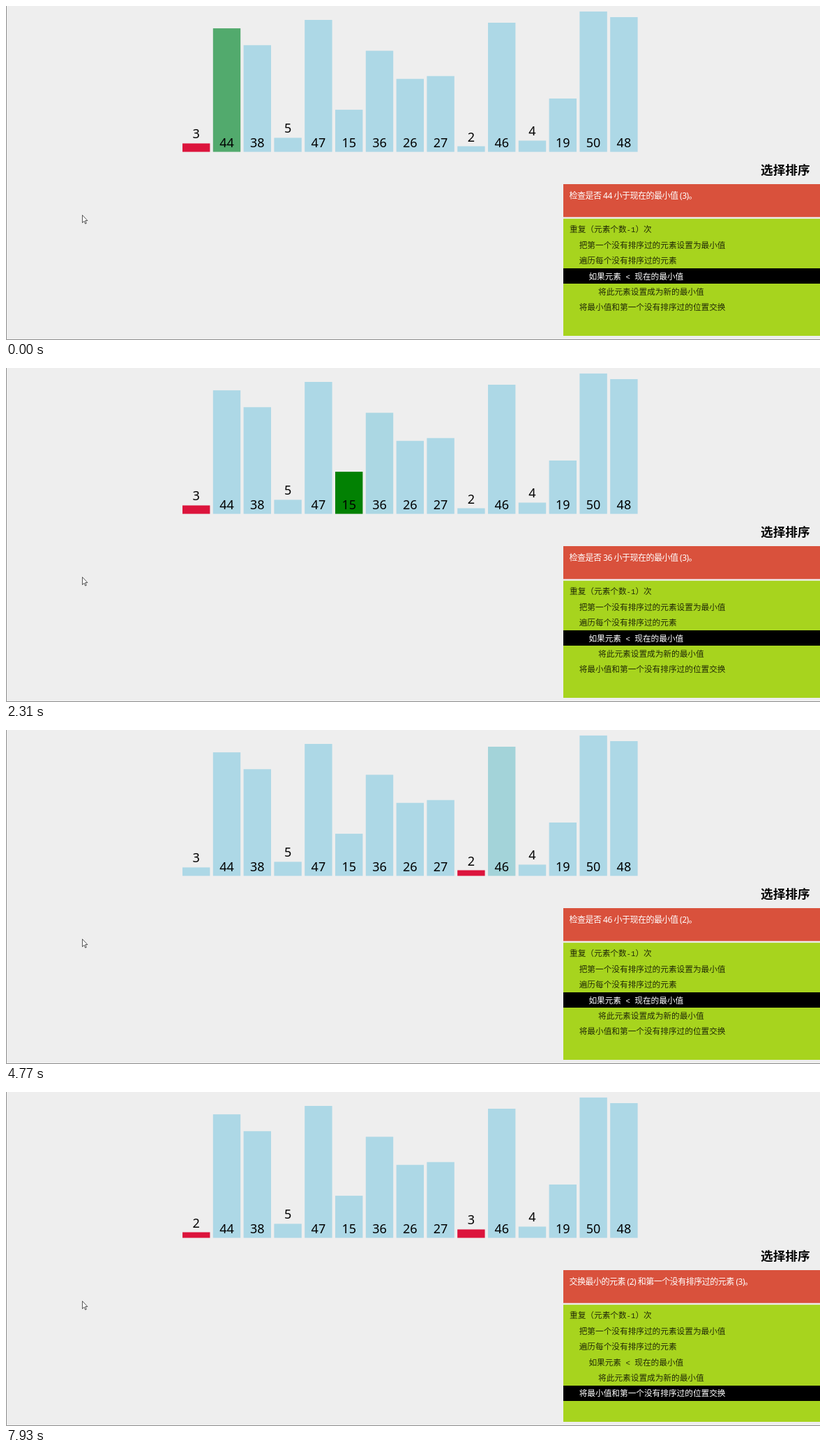
Recreate the animation shown at these times as an HTML page. Size 1167 by 480 pixels, loop 8 s.

```html
<!DOCTYPE html>
<html lang="zh-CN">
<head>
<meta charset="utf-8">
<title>选择排序</title>
<style>
  html, body { margin: 0; width: 100%; height: 100%; overflow: hidden; background: #eee; }
  svg { display: block; }
  text { white-space: pre; }
  .label { font: 18px "Noto Sans", "Open Sans", sans-serif; text-anchor: middle; }
  .title { font: bold 17.6px "Noto Sans CJK SC", "Noto Sans CJK", sans-serif; text-anchor: end; }
  .message { font: 12px "Noto Sans", "Noto Sans CJK SC", "Noto Sans CJK", sans-serif; letter-spacing: -.5px; fill: #fff; }
  .code { font: 300 11.67px "Noto Sans CJK SC Light", "Noto Sans CJK SC", "Noto Sans CJK", sans-serif; fill: #000; fill-opacity: .8; }
  .code.active { fill: #fff; fill-opacity: 1; }
  .latin { font: 10.7px "Liberation Mono", monospace; }
</style>
</head>
<body>
<svg id="stage" width="1167" height="480" viewBox="0 0 1167 480">
  <rect width="1167" height="480" fill="#eee"/>
  <path d="M.5 0V479.5H1167" fill="none" stroke="#8c8c8c"/>
  <g id="bars"></g>
  <text class="title" x="1152.5" y="242">选择排序</text>
  <rect x="799" y="256" width="368" height="47.3" fill="#d9513c"/>
  <text id="message" class="message" x="807.5" y="277"></text>
  <rect x="799" y="305.7" width="368" height="168.3" fill="#a7d41e"/>
  <rect id="highlight" x="799" width="368" height="22"/>
  <g id="code"></g>
  <path d="M109.5 300.5v11l2.5-2.4 1.7 3.9 1.6-.7-1.7-3.8h3.3z" fill="#fff" stroke="#444" stroke-width=".9"/>
</svg>
<script>
const LOOP = 8000, BASE = 209.6, LINE_TOP = 309.9, LINE_HEIGHT = 22.4;
const BLUE = [173, 216, 230], GREEN = [0, 128, 0], RED = [220, 20, 60];

// The picture refreshes at a fixed rate; step and fade lengths are counted in refreshes.
const REFRESH = 136.8, FIRST_REFRESH = 105;
const STEP = 3.56, LEAD = 2.14, FADE = 2.24;

const values = [3, 44, 38, 5, 47, 15, 36, 26, 27, 2, 46, 4, 19, 50, 48];
const code = `重复（元素个数-1）次
  把第一个没有排序过的元素设置为最小值
  遍历每个没有排序过的元素
    如果元素 < 现在的最小值
      将此元素设置成为新的最小值
  将最小值和第一个没有排序过的位置交换`.split('\n');

// One pass of selection sort, recorded as a list of display states.
function sortPass() {
  const steps = [];
  let min = 0;
  const record = (line, message, reds, green, swapped = false) =>
    steps.push({ line, message, reds, green, swapped, min });

  for (let i = 1; i < values.length; i++) {
    record(3, `检查是否 ${values[i]} 小于现在的最小值 (${values[min]})。`, [min], i);
    if (values[i] < values[min]) {
      min = i;
      record(4, `将 ${values[min]} 设置成为新的最小值。`, [min]);
    }
  }
  const message = `交换最小的元素 (${values[min]}) 和第一个没有排序过的元素 (${values[0]})。`;
  record(5, message, [0, min]);
  record(5, message, [0, min], undefined, true);
  return steps;
}
const steps = sortPass();
const initial = { reds: [0], swapped: false };

const byId = id => document.getElementById(id);
function add(parent, tag, attrs, content = '') {
  const el = document.createElementNS('http://www.w3.org/2000/svg', tag);
  for (const key in attrs) el.setAttribute(key, attrs[key]);
  el.textContent = content;
  return parent.appendChild(el);
}

const bars = values.map(value => {
  const group = add(byId('bars'), 'g', {});
  const height = value * 4.034, top = BASE - height;
  const rect = add(group, 'rect', { y: top, width: 39.4, height });
  add(group, 'text', { class: 'label', x: 19.7, y: value < 10 ? top - 7 : 202.6 }, value);
  return { group, rect };
});

const codeLines = code.map((line, i) => {
  const content = line.trimStart();
  const indent = line.length - content.length;
  const el = add(byId('code'), 'text', { x: 808 + 6.85 * indent, y: LINE_TOP + LINE_HEIGHT * i + 15.4 });
  content.split(/([ -~]+)/).forEach((part, k) =>
    add(el, 'tspan', k % 2 ? { class: 'latin' } : {}, part));
  return el;
});

const lerp = (a, b, p) => a + (b - a) * p;
const mix = (a, b, p) => a.map((v, k) => Math.round(lerp(v, b[k], p)));
const easeCubic = p => p < .5 ? 4 * p ** 3 : 1 - 4 * (1 - p) ** 3;

const barColor = (i, state) => state.reds.includes(i) ? RED : i === state.green ? GREEN : BLUE;
function barSlot(i, { swapped, min }) {
  if (!swapped) return i;
  return i === 0 ? min : i === min ? 0 : i;
}

function render(t) {
  const clock = Math.floor((t - FIRST_REFRESH) / REFRESH) + LEAD;
  const index = Math.min(Math.floor(clock / STEP), steps.length - 1);
  const state = steps[index], previous = steps[index - 1] || initial;
  const p = easeCubic(Math.min((clock - index * STEP) / FADE, 1));

  bars.forEach(({ group, rect }, i) => {
    const slot = lerp(barSlot(i, previous), barSlot(i, state), p);
    group.setAttribute('transform', `translate(${253 + 43.8 * slot})`);
    rect.setAttribute('fill', `rgb(${mix(barColor(i, previous), barColor(i, state), p)})`);
  });
  byId('message').textContent = state.message;
  byId('highlight').setAttribute('y', Math.round(LINE_TOP + LINE_HEIGHT * state.line));
  codeLines.forEach((el, i) => el.setAttribute('class', i === state.line ? 'code active' : 'code'));
}

const start = performance.now();
function tick() {
  render((performance.now() - start) % LOOP);
  requestAnimationFrame(tick);
}
tick();
</script>
</body>
</html>
```
